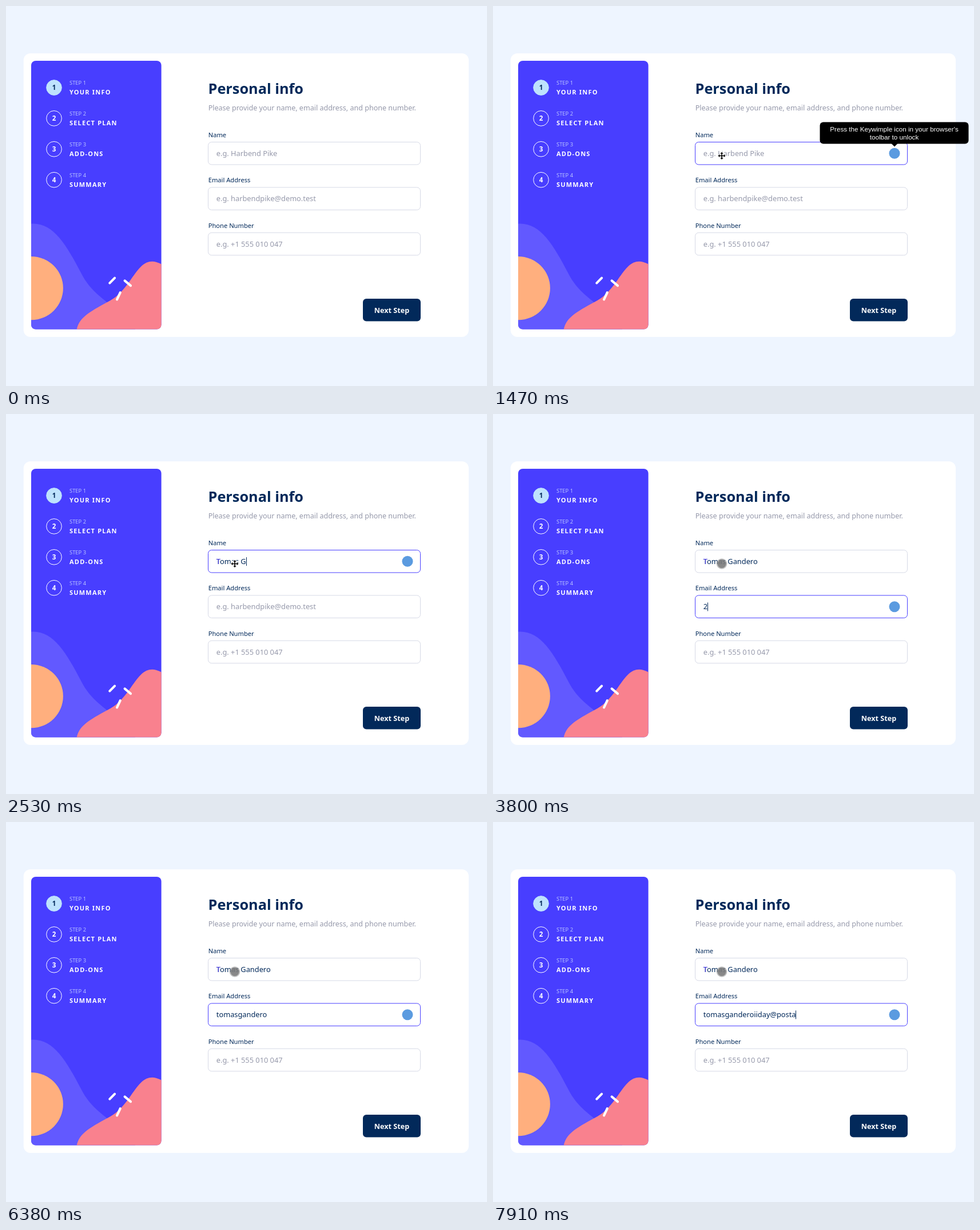
An HTML page with a canvas for the animation above (8000 ms loop, 841x666 px).

```html
<!DOCTYPE html>
<html lang="en">
<head>
<meta charset="utf-8">
<title>Multi-step form</title>
<style>
html, body { margin: 0; width: 100%; height: 100%; overflow: hidden; background: #eef5ff; }
canvas { display: block; width: 841px; height: 666px; }
</style>
</head>
<body>
<canvas id="stage"></canvas>
<script>
const W = 841, H = 666, LOOP = 8000;
const canvas = document.getElementById('stage');
const ctx = canvas.getContext('2d');
const ratio = window.devicePixelRatio || 1;
canvas.width = Math.round(W * ratio);
canvas.height = Math.round(H * ratio);

const NAVY = '#02295a', VIOLET = '#483eff', GREY = '#9699ab', LINE = '#d6d9e6';
const SANS = '"Noto Sans", "Open Sans", sans-serif';
const INPUT_FONT = `500 12.8px ${SANS}`;
const FULL_NAME = 'Tomas Gandero', EMAIL = 'tomasganderoiiday@posta';

// Evenly spaced key presses from a to b
const keys = (a, b, n) => Array.from({ length: n }, (_, i) => a + (b - a) * i / (n - 1));
const nameKeys = [...keys(1670, 2060, 4), ...keys(2400, 2860, 8), 3070];
const emailKeys = [4790, 4930, 4990, ...keys(5130, 5660, 8), 5860,
  ...keys(6720, 6910, 3), 7050, 7110, 7250, ...keys(7580, 7910, 5)];

const FOCUS_NAME = 870, FOCUS_EMAIL = 3270;
const caretOff = [[1400, 1670], [3730, 3800], [4260, 4330], [6380, 6720]];

const within = (t, a, b) => t >= a && t < b;
const typed = (text, times, t) => text.slice(0, times.filter(k => k <= t + 0.5).length);

function text(str, x, y, font, color, align = 'left', spacing = 0) {
  ctx.font = font;
  ctx.fillStyle = color;
  ctx.textAlign = align;
  ctx.letterSpacing = spacing + 'px';
  ctx.fillText(str, x, y);
}

function box(x, y, w, h, r, fill, stroke) {
  ctx.beginPath();
  ctx.roundRect(x, y, w, h, r);
  if (fill) { ctx.fillStyle = fill; ctx.fill(); }
  if (stroke) { ctx.strokeStyle = stroke; ctx.lineWidth = 1; ctx.stroke(); }
}

function disc(x, y, r, fill, stroke) {
  ctx.beginPath();
  ctx.arc(x, y, r, 0, Math.PI * 2);
  if (fill) { ctx.fillStyle = fill; ctx.fill(); }
  if (stroke) { ctx.strokeStyle = stroke; ctx.lineWidth = 1; ctx.stroke(); }
}

const wave = new Path2D('M-34.7 543.1C3.2 632.5 168.8 685 212 612.5c43.2-72.5-66.1-85.7-104.8-160.6-38.6-74.9-68.6-121.6-124.4-104.6-55.9 17.1-55.4 106.4-17.5 195.8z');
const hill = new Path2D('M233.1 601.2c60.7-28.3 92.8-143.6 41.9-171.6-51-28-57.4 47.6-108.1 76-50.6 28.4-82.1 40.2-69 94.3 13.1 54.1 74.5 29.5 135.2 1.3z');
const dashes = new Path2D('M165.3 469.1l10.6-10.8M209.5 474.6l-12.5-10.5M187.6 489l-6.9 14.8');

function sidebar() {
  ctx.save();
  ctx.beginPath();
  ctx.roundRect(44, 96, 227.6, 470.6, 8);
  ctx.clip();
  ctx.fillStyle = VIOLET;
  ctx.fillRect(44, 96, 228, 471);
  ctx.translate(44, 96);
  ctx.scale(0.8305, 0.8305);
  ctx.fillStyle = '#6259ff';
  ctx.fill(wave);
  ctx.fillStyle = '#f9818e';
  ctx.fill(hill);
  disc(0.3, 479.9, 67, '#ffaf7e');
  ctx.strokeStyle = '#fff';
  ctx.lineWidth = 5;
  ctx.lineCap = 'round';
  ctx.stroke(dashes);
  ctx.restore();

  ['YOUR INFO', 'SELECT PLAN', 'ADD-ONS', 'SUMMARY'].forEach((title, i) => {
    const y = 143 + i * 53.9, on = i === 0;
    disc(84, y, 13.3, on ? '#bee2fd' : null, on ? '#bee2fd' : '#fff');
    text(i + 1, 84, y + 4.3, `700 11.6px ${SANS}`, on ? NAVY : '#fff', 'center');
    text('STEP ' + (i + 1), 111, y - 4.7, `400 9.4px ${SANS}`, '#b9c3ff');
    text(title, 111, y + 12, `700 11px ${SANS}`, '#fff', 'left', 1.2);
  });
}

function field(label, y, hint, value, focused, caret) {
  text(label, 353.7, y - 8.3, `400 11.15px ${SANS}`, NAVY);
  box(353.5, y + 0.5, 371, 39.5, 6, '#fff', focused ? VIOLET : LINE);
  text(value || hint, 367.8, y + 25, INPUT_FONT, value ? NAVY : GREY);
  if (focused) {
    disc(702, y + 20.3, 9.5, '#5b9be0');
    if (caret) {
      const end = 367.8 + (value ? ctx.measureText(value).width : 0);
      ctx.fillStyle = NAVY;
      ctx.fillRect(Math.round(end), y + 13, 1, 15);
    }
  }
}

function tooltip() {
  const font = '11.67px "Liberation Sans", Arial, sans-serif';
  box(571.5, 203.5, 260, 38, 6, '#000');
  ctx.beginPath();
  ctx.moveTo(696.5, 241);
  ctx.lineTo(707.5, 241);
  ctx.lineTo(702, 246.5);
  ctx.fill();
  text("Press the Keywimple icon in your browser's", 701.5, 219.5, font, '#fff', 'center');
  text('toolbar to unlock', 701.5, 234.3, font, '#fff', 'center');
}

function moveCursor(x, y) {
  ctx.save();
  ctx.translate(x, y);
  const shape = new Path2D();
  for (let i = 0; i < 4; i++) {
    const arm = new Path2D('M-.8 0V-3.7H-2.7L0-6.5 2.7-3.7H.8V0z');
    shape.addPath(arm, new DOMMatrix().rotate(i * 90));
  }
  ctx.strokeStyle = '#fff';
  ctx.lineWidth = 2;
  ctx.stroke(shape);
  ctx.fillStyle = '#000';
  ctx.fill(shape);
  ctx.restore();
}

function pointer(t) {
  if (t < 70) return;
  if (t < 1470) {
    const step = Math.floor((t - 70) / 67) * 67;
    const p = Math.min(1, step / 600);
    const e = p * p * (3 - 2 * p);
    const x = 359 + 41 * e, y = 583 - 320.5 * e;
    disc(x, y, 10, 'rgba(226,222,90,.85)');
    disc(x, y, 8, '#c3c043');
  } else if (t < FOCUS_EMAIL) {
    moveCursor(400, 262.5);
  } else {
    disc(400, 262.5, 9.3, 'rgba(150,150,150,.6)');
    disc(400, 262.5, 7.5, 'rgba(118,118,118,.75)');
  }
}

function draw(t) {
  ctx.setTransform(ratio, 0, 0, ratio, 0, 0);
  ctx.fillStyle = '#eef5ff';
  ctx.fillRect(0, 0, W, H);
  box(30.7, 83, 778.3, 497, 12, '#fff');
  sidebar();

  text('Personal info', 353.5, 154, `700 25.3px ${SANS}`, NAVY);
  text('Please provide your name, email address, and phone number.',
    353.7, 182.7, `400 12.54px ${SANS}`, GREY);

  const caret = !caretOff.some(([a, b]) => within(t, a, b));
  const name = typed(FULL_NAME, nameKeys, t);
  const email = within(t, 3800, 4330) ? '2' : typed(EMAIL, emailKeys, t);
  field('Name', 238, 'e.g. Harbend Pike', name, within(t, FOCUS_NAME, FOCUS_EMAIL), caret);
  if (name) text(name[0], 367.8, 263, INPUT_FONT, '#3a30dc');
  field('Email Address', 317.4, 'e.g. harbendpike@demo.test', email, t >= FOCUS_EMAIL, caret);
  field('Phone Number', 396.8, 'e.g. +1 555 010 047', '', false, false);

  box(624, 513, 101, 39.5, 6, NAVY);
  text('Next Step', 674.5, 537.7, `600 12.6px ${SANS}`, '#fff', 'center');

  if (within(t, FOCUS_NAME, 1740)) tooltip();
  pointer(t);
}

const start = performance.now();
function tick() {
  draw((performance.now() - start) % LOOP);
  requestAnimationFrame(tick);
}
tick();
</script>
</body>
</html>
```
